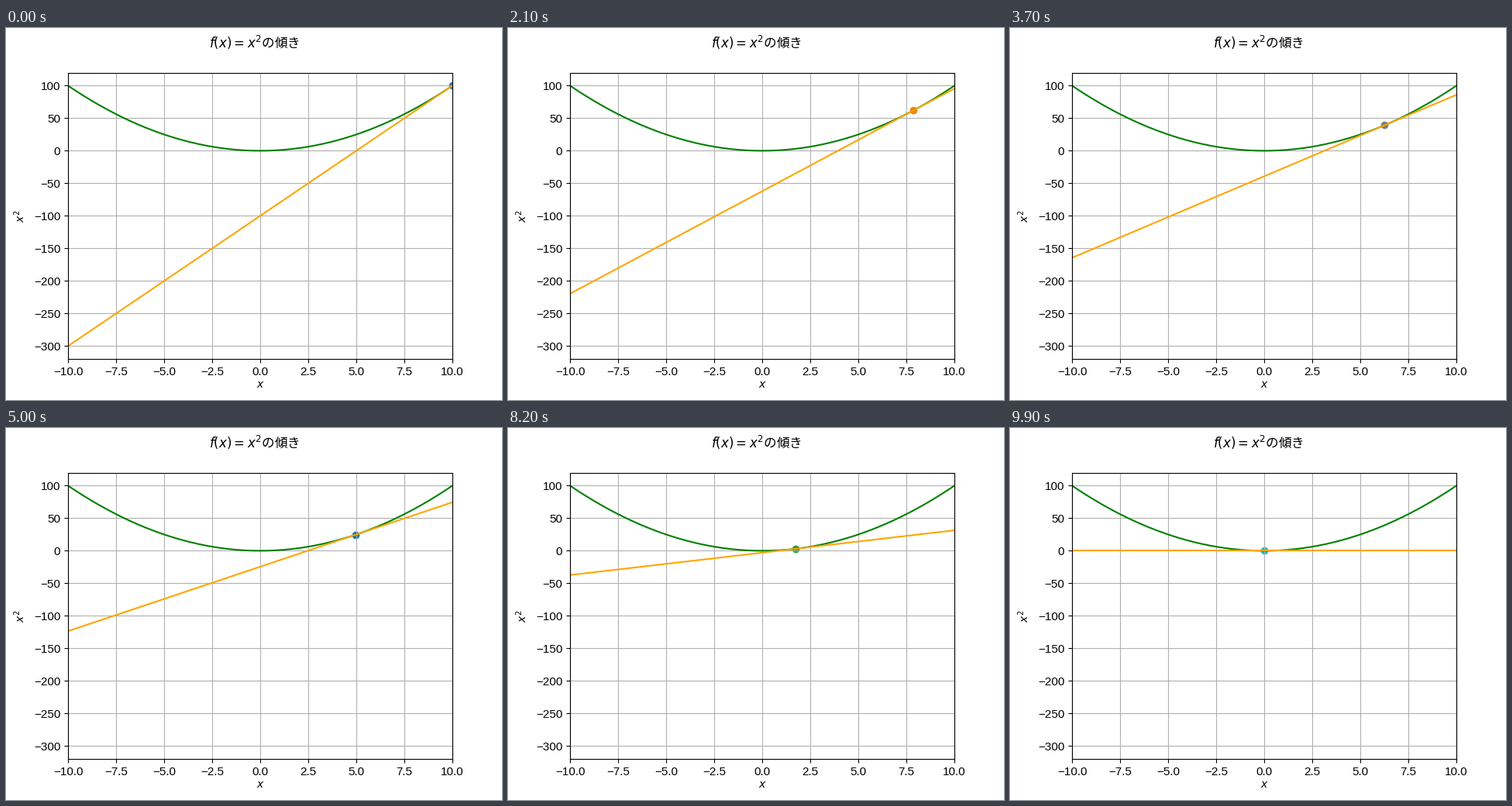
A matplotlib script for the animation above (10000 ms loop, 640 by 480 pixels).

```python
import numpy as np
import matplotlib.pyplot as plt
from matplotlib.animation import FuncAnimation

W, H, DPI = 640, 480, 100
FRAMES, INTERVAL = 100, 100

plt.rcParams["font.family"] = "Liberation Sans"
plt.rcParams["mathtext.fontset"] = "dejavusans"

fig, ax = plt.subplots(figsize=(W / DPI, H / DPI), dpi=DPI)
fig.subplots_adjust(left=0.125, right=0.9, bottom=0.11, top=0.88)


def label(x, y, text, size=10, **kw):
    """Centred text with its baseline at pixel (x, y) from the top left."""
    fig.text(x / W, 1 - y / H, text, fontsize=size, ha="center",
             va="baseline", rotation_mode="anchor", **kw)


label(320.5, 26, "$f(x)=x^2$の傾き", 12, family="Noto Sans CJK JP")
label(328, 464.5, "$x$")
label(24, 242.4, "$x^2$", rotation=90)

ax.set_xlim(-10, 10)
ax.set_ylim(-320, 120)
ax.set_xticks(np.arange(-10, 10.1, 2.5))
ax.set_yticks(np.arange(-300, 101, 50))
ax.tick_params(labelsize=11)
ax.grid(True)

xs = np.linspace(-10, 10, 201)
ax.plot(xs, xs**2, color="green")
tangent, = ax.plot([], [], color="orange")
point = ax.scatter([10], [100])

ends = np.array([-10, 10])
contacts = np.linspace(10, 0, FRAMES)


def update(i):
    a = contacts[i]
    tangent.set_data(ends, 2 * a * ends - a**2)
    point.set_offsets([[a, a**2]])
    point.set_color(f"C{i % 10}")
    return tangent, point


anim = FuncAnimation(fig, update, frames=FRAMES, interval=INTERVAL,
                     repeat=True, repeat_delay=0)
plt.show()
```
